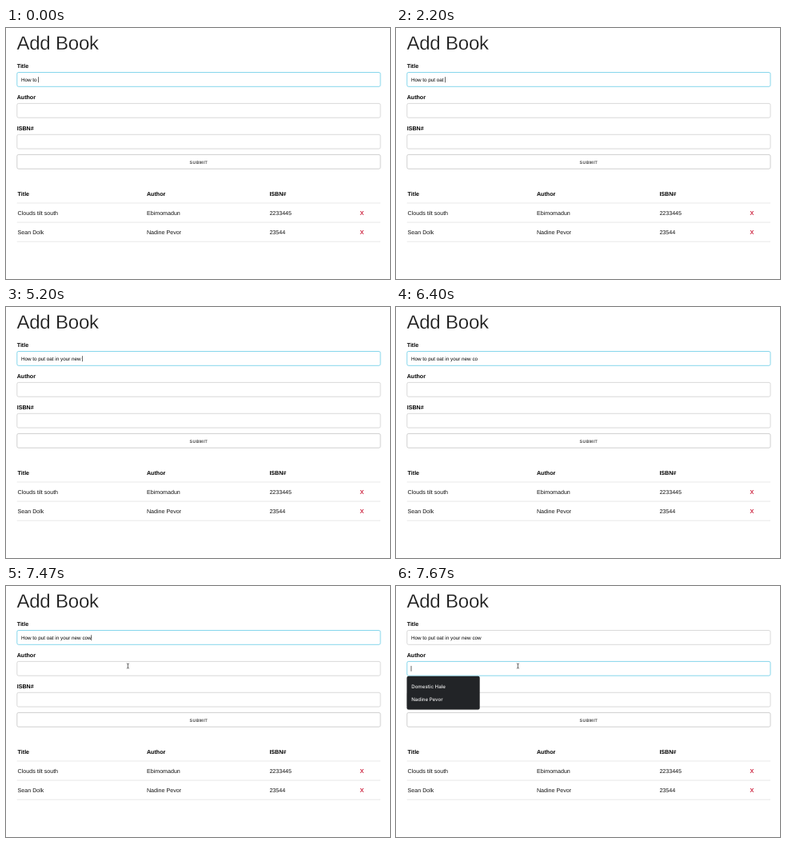
An HTML page that plays this animation: 480x314 px, repeating every 8000 ms.

```html
<!DOCTYPE html>
<html lang="en">
<head>
<meta charset="utf-8">
<title>Add Book</title>
<style>
html, body { margin: 0; width: 100%; height: 100%; overflow: hidden; background: #fff; }
svg { display: block; width: 480px; height: 314px; }
text { font: 7.1px "Liberation Sans", Arial, sans-serif; fill: #111; white-space: pre; text-rendering: geometricPrecision; }
.h1 { font-size: 24px; letter-spacing: -.2px; fill: #181818; stroke: #fff; stroke-width: .3px; }
.b { font-weight: bold; fill: #000; }
.in { font-size: 6.32px; fill: #000; }
.btn { font-size: 5.2px; font-weight: bold; letter-spacing: .474px; fill: #444; }
.x { fill: #c8102e; stroke: #c8102e; stroke-width: .2px; }
.menu text { font: 500 6.16px Inter, "Liberation Sans", sans-serif; fill: #ececec; }
.box { fill: #fff; stroke: #c9c9c9; stroke-width: .7px; }
.box.on { stroke: #52c5e2; }
.rule { stroke: #dedede; stroke-width: .7px; }
</style>
</head>
<body>
<svg id="stage" viewBox="0 0 480 314" xmlns="http://www.w3.org/2000/svg"></svg>
<script>
const LOOP = 8000;
const TITLE = "How to put oat in your new cow";
const START = 7; // characters already typed at time zero
const KEYS = [200, 470, 1400, 1470, 1670, 1870, 2070, 2200, 2670, 2800, 3000, 3470,
  3730, 3930, 4130, 4600, 4730, 4930, 5070, 5200, 5730, 5870, 6470];
const CARET_OFF = [[930, 1400], [6400, 6470], [6870, 7400]];
const FOCUS_AT = 7600, MENU_AT = 7670;
const PATH = [[6870, 167, 62], [7000, 164.4, 68.4], [7200, 156.5, 87], [7400, 152.4, 100]];
const TEXT_X = 18.9, TEXT_SIZE = 6.32;

const stage = document.getElementById("stage");

function add(tag, attrs, parent = stage, content = "") {
  const el = document.createElementNS("http://www.w3.org/2000/svg", tag);
  for (const key in attrs) el.setAttribute(key, attrs[key]);
  el.textContent = content;
  parent.appendChild(el);
  return el;
}
const label = (x, y, content, cls = "", parent = stage) =>
  add("text", { x, y, class: cls }, parent, content);
const box = y =>
  add("rect", { x: 13.8, y, width: 454.2, height: 17.8, rx: 1.9, class: "box" });
const show = (el, on) => el.setAttribute("visibility", on ? "visible" : "hidden");

// Form
label(13.4, 26.6, "Add Book", "h1");
const [titleBox, authorBox] = ["Title", "Author", "ISBN#"].map((name, i) => {
  label(13.7, 50.3 + i * 38.9, name, "b");
  return box(55.5 + i * 38.9);
});
box(158.4).style.stroke = "#bbb";
label(229.5, 169.5, "SUBMIT", "btn");
const typed = label(TEXT_X, 66.8, "", "in");

// Table
const COLS = [14.6, 176, 329.4, 442.5];
["Title", "Author", "ISBN#"].forEach((name, i) => label(COLS[i], 210.4, name, "b"));
[["Clouds tilt south", "Ebimomadun", "2233445", "X"],
 ["Sean Dolk", "Nadine Pevor", "23544", "X"]].forEach((row, r) =>
  row.forEach((cell, i) => label(COLS[i], 234 + r * 24.1, cell, i === 3 ? "x" : "")));
[219, 243.1, 267.2].forEach(y => add("line", { x1: 13.7, x2: 468, y1: y, y2: y, class: "rule" }));

// Suggestions
const menu = add("g", { class: "menu" });
add("rect", { x: 13.2, y: 113.2, width: 91.8, height: 42, rx: 2.4, fill: "#000", opacity: .2 }, menu);
add("rect", { x: 13.6, y: 112.8, width: 91, height: 41.7, rx: 2, fill: "#222427" }, menu);
label(19.2, 127.5, "Domestic Hale", "", menu);
label(19.2, 144.4, "Nadine Pevor", "", menu);

const caret = add("rect", { width: .6, fill: "#000" });
const arrow = add("path", {
  d: "M0 0V6.4L1.5 5.1L2.5 7.3L3.5 6.9L2.6 4.7H4.5Z",
  fill: "#000", stroke: "#fff", "stroke-width": .4
});
const beam = add("path", {
  d: "M-1.5-3Q-.2-3 0-2.4Q.2-3 1.5-3M0-2.4V2.4M-1.5 3Q-.2 3 0 2.4Q.2 3 1.5 3",
  fill: "none", stroke: "#222", "stroke-width": .7
});

const pen = document.createElement("canvas").getContext("2d");
pen.font = '100px "Liberation Sans", Arial, sans-serif';
const widthOf = s => pen.measureText(s).width * TEXT_SIZE / 100;

function pointer(t) {
  let i = 1;
  while (i < PATH.length - 1 && t > PATH[i][0]) i++;
  const [t0, x0, y0] = PATH[i - 1], [t1, x1, y1] = PATH[i];
  const k = Math.min(1, Math.max(0, (t - t0) / (t1 - t0)));
  return [x0 + (x1 - x0) * k, y0 + (y1 - y0) * k];
}

function draw(t) {
  const text = TITLE.slice(0, START + KEYS.filter(k => k <= t).length);
  const inAuthor = t >= FOCUS_AT;
  typed.textContent = text;
  titleBox.classList.toggle("on", !inAuthor);
  authorBox.classList.toggle("on", inAuthor);
  show(menu, t >= MENU_AT);

  show(caret, !CARET_OFF.some(([from, to]) => t >= from && t < to));
  caret.setAttribute("x", inAuthor ? 18.7 : TEXT_X + widthOf(text) - .2);
  caret.setAttribute("y", inAuthor ? 99.9 : 61.2);
  caret.setAttribute("height", inAuthor ? 6.8 : 7);

  const [x, y] = pointer(t);
  const moving = t >= PATH[0][0], overField = y > 94.4;
  show(arrow, moving && !overField);
  show(beam, moving && overField);
  for (const el of [arrow, beam]) el.setAttribute("transform", `translate(${x} ${y})`);
}

const begin = performance.now();
function tick(now) {
  draw(Math.max(0, now - begin) % LOOP);
  requestAnimationFrame(tick);
}
draw(0);
requestAnimationFrame(tick);
</script>
</body>
</html>
```
